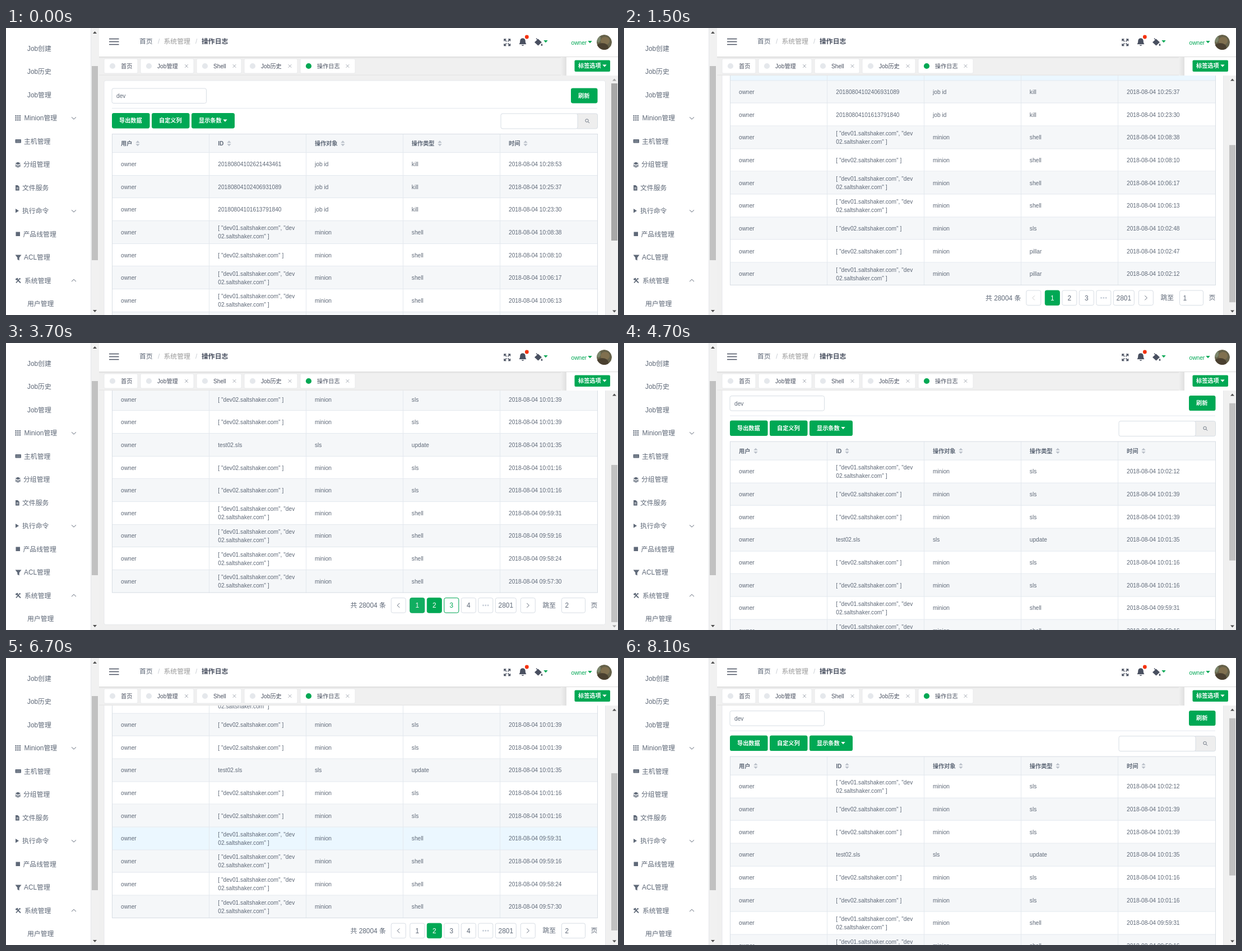
These frames come from a looping animation (1092 by 513 pixels, 8.5 s). An HTML page:

```html
<!DOCTYPE html>
<html lang="zh">
<head>
<meta charset="utf-8">
<title>操作日志</title>
<style>
html, body { margin: 0; width: 100%; height: 100%; overflow: hidden; background: #f0f0f0; }
svg { display: block; }
#stage { width: 100vw; height: 100vh; }
text { font-family: "Liberation Sans", "Noto Sans CJK SC", "Noto Sans CJK", sans-serif; white-space: pre; }
</style>
</head>
<body>
<svg id="stage" viewBox="0 0 1092 513"></svg>
<script>
const LOOP = 8500, ROW = 40.66, ROWS_TOP = 223;
const SMALL = 10.18, MEDIUM = 11.87;
const GREEN = '#00a854', INK = '#5f6978', DARK = '#495060', LINE = '#e3e8ee', EDGE = '#d7dde4';

const rect = (x, y, w, h, fill, extra = '') =>
  `<rect x="${x}" y="${y}" width="${w}" height="${h}" fill="${fill}" ${extra}/>`;
const box = (x, y, w, h, fill = '#fff', stroke = EDGE, r = 3) =>
  rect(x + .5, y + .5, w - 1, h - 1, fill, `rx="${r}" stroke="${stroke}"`);
const path = (d, fill, extra = '') => `<path d="${d}" fill="${fill}" ${extra}/>`;
const line = (d, stroke, width = 1) => path(d, 'none', `stroke="${stroke}" stroke-width="${width}"`);
const circle = (x, y, r, fill, extra = '') => `<circle cx="${x}" cy="${y}" r="${r}" fill="${fill}" ${extra}/>`;
const group = (id, body) => `<g id="${id}">${body}</g>`;
// y is the vertical middle of the line
const text = (x, y, s, size = SMALL, fill = INK, extra = '') =>
  `<text x="${x}" y="${(y + size * .36).toFixed(2)}" font-size="${size}" fill="${fill}" ${extra}>${s}</text>`;
const BOLD = 'font-weight="700"', MIDDLE = 'text-anchor="middle"';
const caret = (x, y, fill) => path(`M${x - 3.7} ${y - 2}h7.4l-3.7 4.2z`, fill);
const button = (x, y, w, h, label, pad = 13, r = 3.4) =>
  rect(x, y, w, h, GREEN, `rx="${r}"`) + text(x + pad, y + h / 2, label, SMALL, '#fff', BOLD);

/* ---------- sidebar ---------- */
const icons = {
  grid: y => [0, 1, 2].map(r => [0, 1, 2].map(c => rect(16.5 + c * 3.6, y - 5 + r * 3.6, 2.3, 2.3, INK)).join('')).join(''),
  host: y => rect(16.5, y - 3.5, 10.5, 6.5, INK, 'rx=".8"') + line(`M18 ${y - 1.2}h7.5M18 ${y + .8}h7.5`, '#aab0b9', .6),
  layers: y => path(`M16.5 ${y - 2}l4.8-2.6 4.8 2.6-4.8 2.5z`, INK) +
    line(`M16.7 ${y + .6}l4.6 2.2 4.6-2.2M16.7 ${y + 2.7}l4.6 2.2 4.6-2.2`, INK, 1.2),
  file: y => path(`M17 ${y - 4.5}h4l2.7 2.7v6.8h-6.7z`, INK) + line(`M18.5 ${y}h3.6M18.5 ${y + 2}h3.6`, '#fff', .8),
  play: y => path(`M17 ${y - 4}l6 3.7-6 3.7z`, INK),
  square: y => rect(17.5, y - 4, 7.5, 7.5, INK),
  funnel: y => path(`M16.5 ${y - 4.5}h11l-3.8 5v5l-3.4-1.7v-3.3z`, INK),
  tools: y => line(`M18 ${y + 4}l6.5-7.5M19 ${y - 3}l7 7`, INK, 1.8) +
    path(`M16.5 ${y - 2.5}l3.5-2.5 2 1.5-3.5 3zM23 ${y - 3}l2-2 1.5 3z`, INK)
};
const menu = [
  ['Job创建', 38], ['Job历史', 38], ['Job管理', 38],
  ['Minion管理', 32.5, 'grid', 1], ['主机管理', 32, 'host'], ['分组管理', 31, 'layers'],
  ['文件服务', 29, 'file'], ['执行命令', 29, 'play', 1], ['产品线管理', 30.5, 'square'],
  ['ACL管理', 32, 'funnel'], ['系统管理', 33, 'tools', -1], ['用户管理', 38]
];
const sidebar = rect(0, 0, 166, 513, '#fff') + menu.map(([label, x, icon, dir], i) => {
  const y = 36.5 + i * 41.5;
  return text(x, y, label, MEDIUM) + (icon ? icons[icon](y) : '') +
    (dir ? line(`M117 ${y - 1.7 * dir}l4 ${3.8 * dir} 4 ${-3.8 * dir}`, INK) : '');
}).join('') +
  rect(151, 0, 15, 513, '#f1f1f1') + rect(151, 0, 1, 513, '#e4e6e9') +
  rect(153, 68, 11, 347, '#c1c1c1') +
  path('M155 10h7l-3.5-4zM155 504h7l-3.5 4z', '#505050');

/* ---------- top bar and tabs ---------- */
const tabs = [
  [175, 61, '首页'], [240, 96, 'Job管理', 322], [340, 81, 'Shell', 407.5],
  [425, 96, 'Job历史', 506.5], [525, 99, '操作日志', 609.5]
];
const avatar = '<g clip-path="url(#face)">' + circle(1067.5, 25.5, 13.5, '#66624a') +
  '<ellipse cx="1069" cy="23" rx="8" ry="7" fill="#80704f"/>' +
  '<ellipse cx="1064" cy="35" rx="11" ry="8" fill="#4a4030"/>' +
  '<ellipse cx="1057" cy="19" rx="4" ry="7" fill="#7c866c"/></g>';
const topBar = rect(166, 0, 926, 51, '#fff') +
  line('M184 19.5h17.5M184 24.5h17.5M184 29.5h17.5', DARK, 1.5) +
  text(238, 24, '首页', MEDIUM) + text(271, 24, '/', MEDIUM, '#c8ccd2') +
  text(281.5, 24, '系统管理', MEDIUM, '#999') + text(338, 24, '/', MEDIUM, '#c8ccd2') +
  text(349, 24, '操作日志', MEDIUM, DARK, BOLD) +
  line('M889 23.5v-3.5h3.5M896 20h3.5v3.5M899.5 28v3.5h-3.5M892.5 31.5h-3.5v-3.5' +
    'M889.5 20.5l3.6 3.6M899 20.5l-3.6 3.6M899 31l-3.6-3.6M889.5 31l3.6-3.6', DARK, 1.5) +
  path('M915.5 29c2-2 1.5-5 2-7.5a4.8 4.8 0 0 1 9 0c.5 2.5 0 5.5 2 7.5zM919.5 30.2h5q-2.5 3.5-5 0z', DARK) +
  circle(929.3, 16, 3.4, '#f5320f') +
  path('M943 25.5l6.5-6 6.5 6-6.5 6zM956 27.5q2.8 4 0 4.5-2.8-.5 0-4.5z', DARK) +
  line('M946 18.5l5 5', DARK, 1.2) + caret(963, 24, GREEN) +
  text(1008.5, 26, 'owner', SMALL, GREEN) + caret(1042, 25, GREEN) + avatar;

const tabBar = rect(166, 51, 926, 34, '#f0f0f0') +
  rect(166, 51, 926, 1.5, '#dcdcdc') + rect(166, 52.5, 926, 1.5, '#e8e8e8') + rect(166, 83.5, 926, 1.5, '#e8e8e8') +
  tabs.map(([x, w, label, close], i) =>
    box(x - .5, 54.5, w, 27, '#fff', '#e9eaec', 2) +
    circle(x + 15, 68, 5.1, i == 4 ? GREEN : '#e5e8ec') +
    text(x + 30, 68, label, SMALL, DARK) +
    (close ? line(`M${close - 2.8} 65.2l5.6 5.6m0-5.6l-5.6 5.6`, '#9aa0aa', .9) : '')).join('') +
  rect(990, 52, 10, 33, 'url(#shade)') + rect(1000, 52, 92, 33, '#fff') +
  button(1014.5, 57.5, 63.5, 20.5, '标签选项', 6.5, 2) + caret(1068, 67.5, '#fff');

/* ---------- log table ---------- */
const BOTH = '[ "dev01.saltshaker.com", "dev|02.saltshaker.com" ]', ONE = '[ "dev02.saltshaker.com" ]';
const pages = [
  [
    ['20180804102621443461', 'job id', 'kill', '10:28:53'], ['20180804102406931089', 'job id', 'kill', '10:25:37'],
    ['20180804101613791840', 'job id', 'kill', '10:23:30'], [BOTH, 'minion', 'shell', '10:08:38'],
    [ONE, 'minion', 'shell', '10:08:10'], [BOTH, 'minion', 'shell', '10:06:17'],
    [BOTH, 'minion', 'shell', '10:06:13'], [ONE, 'minion', 'sls', '10:02:48'],
    [ONE, 'minion', 'pillar', '10:02:47'], [BOTH, 'minion', 'pillar', '10:02:12']
  ], [
    [BOTH, 'minion', 'sls', '10:02:12'], [ONE, 'minion', 'sls', '10:01:39'],
    [ONE, 'minion', 'sls', '10:01:39'], ['test02.sls', 'sls', 'update', '10:01:35'],
    [ONE, 'minion', 'sls', '10:01:16'], [ONE, 'minion', 'sls', '10:01:16'],
    [BOTH, 'minion', 'shell', '09:59:31'], [BOTH, 'minion', 'shell', '09:59:16'],
    [BOTH, 'minion', 'shell', '09:58:24'], [BOTH, 'minion', 'shell', '09:57:30']
  ]
];
const columns = [205, 378.3, 551, 723.8, 897];
const heads = [['用户', 235], ['ID', 398], ['操作对象', 601], ['操作类型', 774], ['时间', 927]];
const rowTop = i => ROWS_TOP + i * ROW;
const tableEnd = rowTop(10);

const cell = (x, y, s) => {
  const parts = s.split('|');
  return parts.map((part, k) => text(x, y + (k - (parts.length - 1) / 2) * 15, part)).join('');
};
const rowTexts = rows => rows.map(([id, target, kind, time], i) =>
  ['owner', id, target, kind, '2018-08-04 ' + time].map((s, c) => cell(columns[c], rowTop(i) + 20.2, s)).join('')).join('');

const stripes = pages[0].map((_, i) => rect(189.5, rowTop(i), 866, ROW, '#fff', 'class="row"')).join('');
const table = rect(189.5, 189.5, 866, 34, '#f5f7f9') + stripes +
  line(pages[0].map((_, i) => `M189 ${Math.round(rowTop(i)) - .5}h866.5`).join(''), LINE) +
  line([362.5, 535.5, 708.5, 881.5].map(x => `M${x} 189.5V${tableEnd}`).join(''), LINE) +
  rect(189.5, 189.5, 866, tableEnd - 190, 'none', `stroke="${EDGE}"`) +
  heads.map(([label, x], c) => text(columns[c], 206.5, label, SMALL, INK, BOLD) +
    path(`M${x - 3.7} 205.2h7.4l-3.7-4zM${x - 3.7} 207.3h7.4l-3.7 4z`, '#bbc1ca')).join('');

const toolbar = box(188.5, 107.5, 169.5, 27.5) + text(197, 121.5, 'dev') +
  button(1008, 107.5, 47.5, 27, '刷新') + rect(189, 143, 866, 1, LINE) +
  button(189, 152, 67.5, 27.5, '导出数据') + button(260, 152, 67.5, 27.5, '自定义列') +
  button(331, 152, 77, 27.5, '显示条数') + caret(391, 165.5, '#fff') +
  box(1016, 152.5, 40, 28, '#eee') + box(882.5, 152.5, 138, 28) +
  circle(1036.5, 165.5, 2.7, 'none', `stroke="${INK}" stroke-width=".9"`) + line('M1038.5 167.5l2.5 2.5', INK);

/* ---------- pager ---------- */
const PAGER_TOP = 638.2, PAGER_MID = 652;
const slot = n => 720.3 + n * 30.5;
const itemStyles = { plain: ['#fff', EDGE, INK], hover: ['#fff', GREEN, GREEN], active: [GREEN, GREEN, '#fff'] };
const pageItem = (x, label, style = 'plain', w = 27) => {
  const [fill, stroke, ink] = itemStyles[style];
  return box(x, PAGER_TOP, w, 27.5, fill, stroke) + text(x + w / 2, PAGER_MID, label, MEDIUM, ink, MIDDLE);
};
const arrow = (x, dir, ink) => box(x, PAGER_TOP, 27, 27.5) +
  line(`M${x + 13.5 - 2 * dir} ${PAGER_MID - 4}l${4 * dir} 4 ${-4 * dir} 4`, ink);
const pager = (left, current, ink, items) =>
  text(left, PAGER_MID, '共 28004 条', MEDIUM) + arrow(left + 72.3, -1, ink) + items +
  box(slot(4), PAGER_TOP, 27, 27.5) + [-1, 0, 1].map(k => circle(855.8 + k * 4.3, PAGER_MID, 1.4, '#c3cbd6')).join('') +
  pageItem(872.8, '2801', 'plain', 38) + arrow(917.8, 1, INK) + text(957.5, PAGER_MID - .5, '跳至', MEDIUM) +
  box(991, PAGER_TOP, 43, 27.5) + text(997.5, PAGER_MID, current, MEDIUM) + text(1043.5, PAGER_MID - .5, '页', MEDIUM);

const pager1 = pager(645, 1, '#ccc',
  pageItem(slot(1), 1, 'active') + pageItem(slot(2), 2) +
  group('hoverTwo', pageItem(slot(2), 2, 'hover')) + pageItem(slot(3), 3));
const pager2 = pager(614.5, 2, INK,
  pageItem(slot(0), 1) + group('fadeOne', pageItem(slot(0), 1, 'active')) + pageItem(slot(1), 2, 'active') +
  pageItem(slot(2), 3) + group('hoverThree', pageItem(slot(2), 3, 'hover')) + pageItem(slot(3), 4));

/* ---------- assembly ---------- */
const $ = id => document.getElementById(id);
$('stage').innerHTML =
  `<defs><clipPath id="view"><rect x="166" y="85" width="914" height="428"/></clipPath>
   <clipPath id="face"><circle cx="1067.5" cy="25.5" r="13.5"/></clipPath>
   <linearGradient id="shade"><stop stop-color="#f0f0f0"/><stop offset="1" stop-color="#e0e0e0"/></linearGradient></defs>` +
  rect(0, 0, 1092, 513, '#f0f0f0') +
  '<g clip-path="url(#view)">' + group('content',
    box(174.5, 93.5, 895.5, 593.5, '#fff', '#e6e8eb', 3) + toolbar + table +
    group('page1', rowTexts(pages[0]) + pager1) + group('page2', rowTexts(pages[1]) + pager2)) + '</g>' +
  rect(1079, 85, 13, 428, '#f1f1f1') + rect(1080, 99, 11, 281, '#c1c1c1', 'id="thumb"') +
  path('M1082 94.5h7l-3.5-4z', '#505050', 'id="up"') + path('M1082 504.5h7l-3.5 4z', '#505050', 'id="down"') +
  sidebar + topBar + tabBar;

/* ---------- motion: [start, value], held until the next entry ---------- */
const scrollKeys = [[0, 0], [1200, 17], [1300, 80], [1400, 140], [1500, 169.6], [1900, 175], [2000, 183],
  [4500, 164.5], [4600, 75], [4700, 13.4], [5300, 20], [5400, 104], [5500, 165], [5600, 183],
  [6700, 164.5], [6800, 75], [6900, 13.4]];
const hoverKeys = [[0, -1], [500, 0], [1900, -1], [5000, 2], [5800, 6], [7100, 2], [7600, -1]];
const thumbKeys = [[0, '#a8a8a8'], [100, '#c1c1c1'], [7700, '#a8a8a8'], [8000, '#c1c1c1']];
const valueAt = (keys, t) => keys.filter(([start]) => start <= t).pop()[1];
const clamp = v => Math.max(0, Math.min(1, v));
const rows = [...document.querySelectorAll('.row')];
const set = (id, name, value) => $(id).setAttribute(name, value);

function draw(now) {
  const t = Math.floor(now % LOOP / 100) * 100;
  const scroll = valueAt(scrollKeys, t), hovered = valueAt(hoverKeys, t), second = t >= 3700;
  set('content', 'transform', `translate(0 ${-scroll})`);
  set('page1', 'display', second ? 'none' : 'inline');
  set('page2', 'display', second ? 'inline' : 'none');
  set('hoverTwo', 'opacity', clamp((t - 2800) / 300));
  set('fadeOne', 'opacity', clamp(.93 - (t - 3700) / 200));
  set('hoverThree', 'opacity', t < 4500 ? 1 : 0);
  rows.forEach((row, i) => row.setAttribute('fill', i == hovered ? '#ebf7ff' : i % 2 ? '#f5f7f9' : '#fff'));
  set('thumb', 'y', 99 + scroll * .65);
  set('thumb', 'fill', valueAt(thumbKeys, t));
  set('up', 'fill', scroll > 0 ? '#505050' : '#a3a3a3');
  set('down', 'fill', scroll < 183 ? '#505050' : '#a3a3a3');
}
const began = performance.now();
function tick() {
  draw(performance.now() - began);
  requestAnimationFrame(tick);
}
tick();
</script>
</body>
</html>
```
